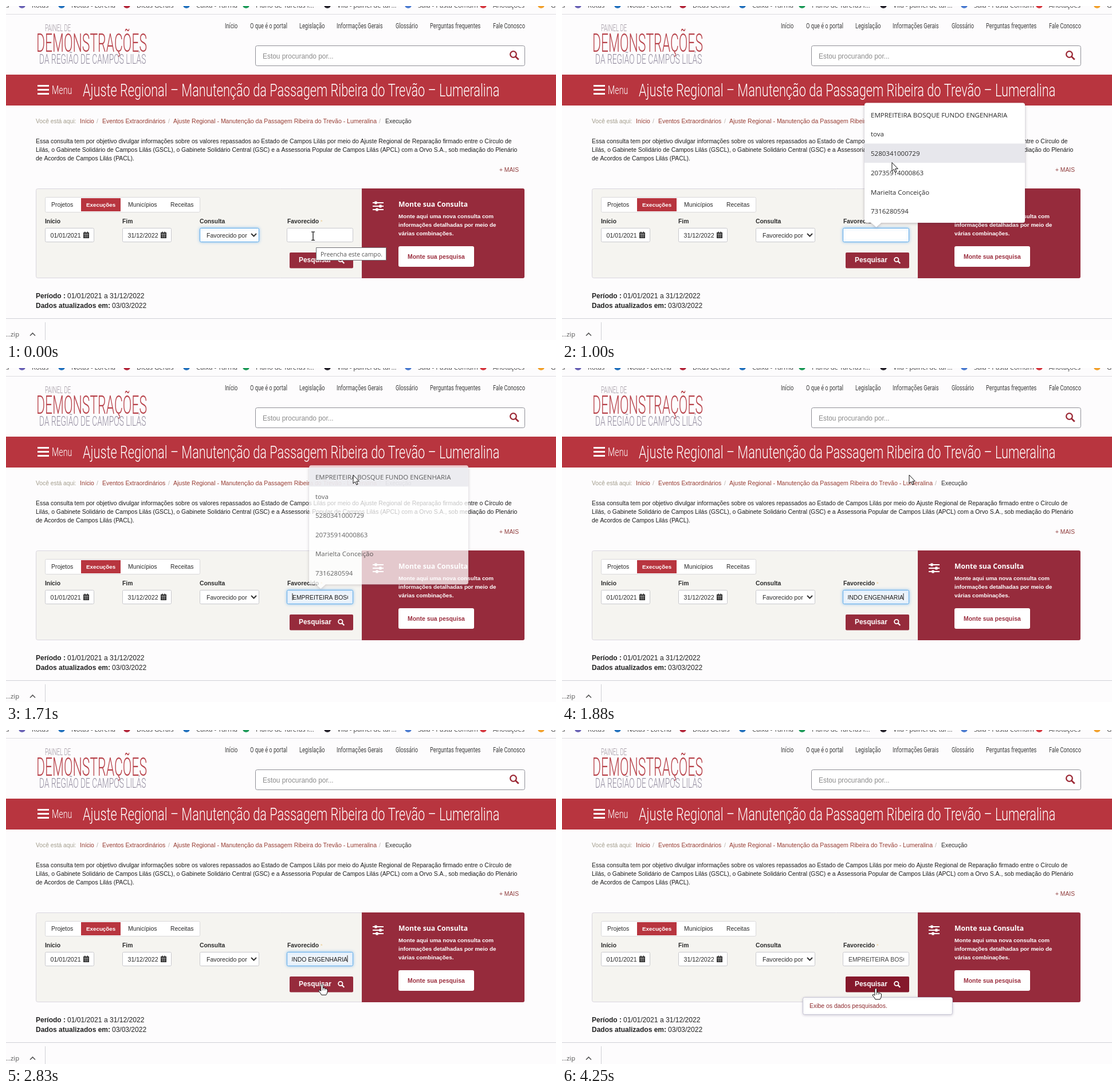
These frames come from a looping animation (960x584 px, 8000 ms). An HTML page with a canvas:

```html
<!DOCTYPE html>
<html lang="pt">
<head>
<meta charset="utf-8">
<title>Consulta de execuções</title>
<style>
  html, body { margin: 0; width: 100%; height: 100%; overflow: hidden; background: #fdfcfd; }
  canvas { display: block; width: 960px; height: 584px; }
</style>
</head>
<body>
<canvas id="stage" width="960" height="584"></canvas>
<script>
const ctx = document.getElementById('stage').getContext('2d');
const LOOP = 8000;
const ARIAL = '"Liberation Sans", Arial, sans-serif';
const OPEN = '"Open Sans", "Noto Sans", sans-serif';
const WINE = '#962b3c', RED = '#b8353f', INK = '#2b2b2b', PANEL = '#f5f4f0';
const TITLE = 'Ajuste Regional - Manutenção da Passagem Ribeira do Trevão - Lumeralina';
const COMPANY = 'EMPREITEIRA BOSQUE FUNDO ENGENHARIA';
const SUGGESTIONS = [COMPANY, 'tova', '5280341000729', '20735914000863', 'Marielta Conceição', '7316280594'];

// Moments of the interaction, in ms
const FOCUS = 260, PICK = 1670, FILLED = 1830, HOVER = 2880, PRESS = 3050, RELEASE = 3590;

// Pointer path: time, x, y
const PATH = [[0, 536, 402], [620, 536, 402], [1250, 597, 206], [1430, 606, 187],
  [2240, 606, 187], [2670, 575, 396], [2880, 548, 452]];

const ramp = (t, a, b) => Math.min(1, Math.max(0, (t - a) / (b - a)));
const ease = k => k * k * (3 - 2 * k);

function text(str, x, y, size = 10.4, color = INK, weight = 400, family = ARIAL) {
  ctx.font = `${weight} ${size}px ${family}`;
  ctx.fillStyle = color;
  ctx.fillText(str, x, y);
}
const bold = (str, x, y, size, color) => text(str, x, y, size, color, 700);

// Condensed face for headings
function narrow(str, x, y, size, color, weight = 300, ratio = 0.71) {
  ctx.save();
  ctx.translate(x, y);
  ctx.scale(ratio, 1);
  text(str, 0, 0, size, color, weight, 'Roboto, sans-serif');
  ctx.restore();
}

function rect(x, y, w, h, fill) {
  ctx.fillStyle = fill;
  ctx.fillRect(x, y, w, h);
}

function box(x, y, w, h, r, fill, stroke, width = 1) {
  ctx.beginPath();
  ctx.roundRect(x, y, w, h, r);
  ctx.fillStyle = fill;
  ctx.fill();
  if (stroke) {
    ctx.lineWidth = width;
    ctx.strokeStyle = stroke;
    ctx.stroke();
  }
}

function line(points, color, width = 1) {
  ctx.beginPath();
  points.forEach(([x, y]) => ctx.lineTo(x, y));
  ctx.strokeStyle = color;
  ctx.lineWidth = width;
  ctx.stroke();
}

function shadow(color, blur, dy = 0) {
  ctx.shadowColor = color;
  ctx.shadowBlur = blur;
  ctx.shadowOffsetY = dy;
}

function field(x, w, focused, fill = '#fff') {
  ctx.save();
  if (focused) shadow('rgba(80,165,240,.6)', 5);
  box(x + .5, 388.5, w - 1, 24, 2, fill, focused ? '#66afe9' : '#c8c8cd');
  ctx.restore();
}

function magnifier(x, y, r, color, width) {
  ctx.beginPath();
  ctx.arc(x, y, r, 0, 7);
  ctx.strokeStyle = color;
  ctx.lineWidth = width;
  ctx.stroke();
  line([[x + r * .7, y + r * .7], [x + r * 1.75, y + r * 1.75]], color, width * 1.2);
}

function calendar(x) {
  rect(x, 396, 10, 10, '#2c2c2c');
  rect(x + 2, 394.5, 1.5, 3, '#2c2c2c');
  rect(x + 6.5, 394.5, 1.5, 3, '#2c2c2c');
  rect(x + 1, 398.5, 8, .8, '#fff');
  for (let i = 1; i < 3; i++) {
    rect(x + 1, 399 + i * 2.3, 8, .5, '#bbb');
    rect(x + i * 3.1, 399, .5, 6, '#bbb');
  }
}

function bookmarks() {
  const items = [[28, '#6a62b5', 'Rotas'], [97, '#2271bd', 'Notas - Lorena'],
    [211, '#b3263a', 'Dicas Gerais'], [315, '#2271bd', 'Caixa - Turma'],
    [419, '#1d9a58', 'Plano de Tarefas I...'], [561, '#25222b', 'Vila - painel de tar...'],
    [702, '#4b7bd0', 'Sala - Pasta Comum'], [833, '#d5373f', 'Anotações'], [934, '#f2a12d', 'Guia']];
  text('s', 0, 2.5, 11.3, '#444', 400, OPEN);
  for (const [x, color, label] of items) {
    ctx.beginPath();
    ctx.arc(x, -2, 6, 0, 7);
    ctx.fillStyle = color;
    ctx.fill();
    text(label, x + 17, 2.5, 11.3, '#444', 400, OPEN);
  }
  rect(0, 14, 960, 1, '#dcdbe0');
}

function header() {
  bookmarks();
  narrow('PAINEL DE', 68, 44, 16, '#9b929d', 300, .6);
  narrow('DEMONSTRAÇÕES', 53, 80, 45, '#b8434b', 300, .51);
  narrow('DA REGIÃO DE CAMPOS LILÁS', 58, 101, 23, '#918a9d', 300, .6);

  const nav = [[382, 'Início'], [426, 'O que é o portal'], [512, 'Legislação'], [577, 'Informações Gerais'],
    [680, 'Glossário'], [740, 'Perguntas frequentes'], [850, 'Fale Conosco']];
  for (const [x, label] of nav) narrow(label, x, 39, 13, '#3c3c3c', 400);

  box(435.5, 69.5, 470, 35, 3, '#fff', '#8f8f96');
  text('Estou procurando por...', 448, 91.5, 11.9, '#8b8b8b');
  magnifier(885.5, 84.5, 5.3, '#9c2a36', 2.3);

  rect(0, 120, 960, 54, RED);
  for (let i = 0; i < 3; i++) rect(55, 138 + i * 7, 20, 3, '#fff');
  narrow('Menu', 80, 153.5, 20, '#fff');
  narrow(TITLE.replaceAll('-', '–'), 134, 158, 30.6, '#fff');
}

function intro() {
  const link = '#973c32', slash = '#b9b3ad';
  text('Você está aqui:', 52, 205, 10.3, '#a39d8c');
  text('Início', 129, 205, 10.4, link);
  text('Eventos Extraordinários', 168, 205, 10.4, link);
  text(TITLE, 292, 205, 10.5, link);
  for (const x of [158, 283, 651]) text('/', x, 205, 10.4, slash);
  text('Execução', 662, 205);

  const body = [
    'Essa consulta tem por objetivo divulgar informações sobre os valores repassados ao Estado de Campos Lilás por meio do Ajuste Regional de Reparação firmado entre o Círculo de',
    'Lilás, o Gabinete Solidário de Campos Lilás (GSCL), o Gabinete Solidário Central (GSC) e a Assessoria Popular de Campos Lilás (APCL) com a Orvo S.A., sob mediação do Plenário',
    'de Acordos de Campos Lilás (PACL).'];
  body.forEach((row, i) => text(row, 52, 240 + i * 15, 10.4, '#1c1c1c'));
  text('+ MAIS', 861, 290, 10.3, '#8e3a3a');
}

function builder() {
  ctx.beginPath();
  ctx.roundRect(621, 319, 284, 157, [0, 3, 3, 0]);
  ctx.fillStyle = WINE;
  ctx.fill();
  [[344, 645], [350, 653], [356, 647]].forEach(([y, knob]) => {
    rect(640, y - 1, 19, 2, '#fff');
    rect(knob - 1.5, y - 2.5, 4, 5, '#fff');
  });
  text('Monte sua Consulta', 685, 351, 12.2, '#fff', 700, OPEN);
  ['Monte aqui uma nova consulta com', 'informações detalhadas por meio de', 'várias combinações.']
    .forEach((row, i) => bold(row, 685, 371 + i * 15, 9.8, '#fff'));
  box(685, 420, 132, 36, 3, '#fff');
  bold('Monte sua pesquisa', 701, 442, 10.45, '#9c3040');
}

function favoured(t) {
  const focused = t >= FOCUS && t < PRESS;
  const filled = t >= PICK;
  field(490, 116, focused, focused && filled ? '#eff5fc' : '#fff');
  ctx.save();
  ctx.beginPath();
  ctx.rect(499, 390, 98, 21);
  ctx.clip();
  const atEnd = t >= FILLED && t < PRESS;
  if (filled) {
    ctx.textAlign = atEnd ? 'right' : 'left';
    text(COMPANY, atEnd ? 596 : 500, 404.5, 10.4, focused ? '#1c1c1c' : '#444');
  }
  const since = atEnd ? FILLED : filled ? PICK : FOCUS;
  if (focused && (t - since) % 1000 < 500) rect(atEnd ? 595.5 : 499.5, 394, 1, 12, '#222');
  ctx.restore();
}

function searchButton(t) {
  const fill = t >= HOVER ? '#85182b' : WINE;
  if (t >= PRESS && t < RELEASE) box(497, 433, 108, 24, 2, fill, '#1c060c', 2);
  else box(495, 431, 111, 27.5, 2, fill);
  bold('Pesquisar', 511, 448, 11.9, '#fff');
  magnifier(583.8, 443.5, 3.7, '#fff', 1.8);
}

function form(t) {
  box(52.5, 319.5, 852, 156, 3, PANEL, '#d9d6df');
  builder();

  box(68.5, 334.5, 270, 26, 2, '#fff', '#d9d8da');
  rect(131, 336, 69, 23, RED);
  text('Projetos', 79, 351);
  bold('Execuções', 140, 351, 9.8, '#fff');
  text('Municípios', 213, 351, 10.6);
  text('Receitas', 287, 351);

  [[68, 'Início'], [203, 'Fim'], [338, 'Consulta'], [491, 'Favorecido']]
    .forEach(([x, label]) => bold(label, x, 380, 10.35, INK));
  text('*', 549, 380, 9, '#ecc98a');

  field(68, 86);
  text('01/01/2021', 77.5, 404.5, 10.6);
  calendar(135);
  field(203, 86);
  text('31/12/2022', 212.5, 404.5, 10.6);
  calendar(270);
  field(338, 104, t < FOCUS);
  text('Favorecido por', 350, 404.5, 10.6);
  line([[428, 398], [432.5, 402.5], [437, 398]], '#333', 2);

  favoured(t);
  searchButton(t);
}

function footer() {
  bold('Período :', 52, 511, 12, '#222');
  text('01/01/2021 a 31/12/2022', 107, 511, 12.1, '#222');
  bold('Dados atualizados em:', 52, 528, 12, '#222');
  text('03/03/2022', 185, 528, 12, '#222');
  rect(0, 546, 960, 1, '#d0d0d6');
  text('...zip', -1, 578, 11.3, '#555', 400, OPEN);
  line([[42, 576.5], [46.5, 572], [51, 576.5]], '#555', 1.6);
  rect(68, 553, 1, 31, '#d0d0d6');
}

function bubble() {
  const path = new Path2D();
  path.roundRect(528, 169.5, 280, 209.5, 4);
  path.moveTo(540, 379);
  path.lineTo(548.5, 386.5);
  path.lineTo(557, 379);
  return path;
}

function suggestions(t, pointer) {
  const alpha = ramp(t, 280, 400) * (1 - ramp(t, PICK, FILLED));
  if (!alpha) return;
  const scale = .97 + .03 * alpha, pitch = 33.75, shell = bubble();
  ctx.save();
  ctx.globalAlpha = alpha;
  ctx.translate(668, 274);
  ctx.scale(scale, scale);
  ctx.translate(-668, -274);

  // Keep the shadow outside, so it never shows through the fading fill
  const outside = new Path2D();
  outside.rect(0, 0, 960, 584);
  outside.addPath(shell);
  ctx.save();
  ctx.clip(outside, 'evenodd');
  shadow('rgba(60,50,70,.35)', 5, 1);
  ctx.fillStyle = '#fff';
  ctx.fill(shell);
  ctx.restore();
  ctx.fillStyle = '#fff';
  ctx.fill(shell);

  const hovered = Math.floor((pointer.y - 173) / pitch);
  if (hovered >= 0 && hovered < SUGGESTIONS.length && pointer.x > 528)
    rect(528, 173 + hovered * pitch, 280, pitch, '#e7e7ec');
  SUGGESTIONS.forEach((s, i) => text(s, 539, 194.5 + i * pitch, 11.5, INK, 400, OPEN));
  ctx.restore();
}

function tooltips(t) {
  if (t < FOCUS - 60) {
    box(541.5, 422.5, 122, 22, 0, '#fff', '#6f6f74');
    text('Preencha este campo.', 549, 437.5, 10.5, '#555', 400, OPEN);
  }
  if (t >= HOVER) {
    ctx.save();
    shadow('rgba(60,50,90,.2)', 4, 1);
    box(420.5, 467.5, 261, 30, 3, '#fff', '#c6c5d4');
    ctx.restore();
    text('Exibe os dados pesquisados.', 432, 486, 10.45, '#8e2a2e');
  }
}

function pointerAt(t) {
  let i = 0;
  while (i < PATH.length - 2 && t >= PATH[i + 1][0]) i++;
  const [t0, x0, y0] = PATH[i], [t1, x1, y1] = PATH[i + 1];
  const k = ease(ramp(t, t0, t1));
  return { x: x0 + (x1 - x0) * k, y: y0 + (y1 - y0) * k };
}

function shape(path) {
  const p = new Path2D(path);
  ctx.fillStyle = '#fff';
  ctx.fill(p);
  ctx.strokeStyle = '#111';
  ctx.lineWidth = 1;
  ctx.stroke(p);
}

function cursor({ x, y }) {
  const inside = (l, top, r, b) => x >= l && x <= r && y >= top && y <= b;
  ctx.save();
  ctx.translate(x, y);
  if (inside(490, 388, 606, 413)) {
    line([[0, -6.5], [0, 7]], '#111', 1.3);
    for (const end of [-7, 7.5]) line([[-3, end], [3, end]], '#111', 1.2);
  } else if (inside(495, 431, 606, 459)) {
    shape('M-2 1Q0-2 1.5 1V7Q4 5.5 5 8Q7 7 8 9Q10 8.5 9.5 12Q9.5 16 7 19H-1Q-3 15-6 12Q-6 9-2 12Z');
    line([[1.5, 7], [1.5, 11]], '#111', .8);
    line([[5, 8], [5, 11]], '#111', .8);
  } else {
    shape('M0 0V15L3.4 11.8L5.8 17.2L8.1 16.2L5.8 11H10.4Z');
  }
  ctx.restore();
}

function draw(t) {
  const pointer = pointerAt(t);
  rect(0, 0, 960, 584, '#fdfcfd');
  header();
  intro();
  form(t);
  footer();
  suggestions(t, pointer);
  tooltips(t);
  cursor(pointer);
}

const start = performance.now();
function tick() {
  draw((performance.now() - start) % LOOP);
  requestAnimationFrame(tick);
}
tick();
</script>
</body>
</html>
```
